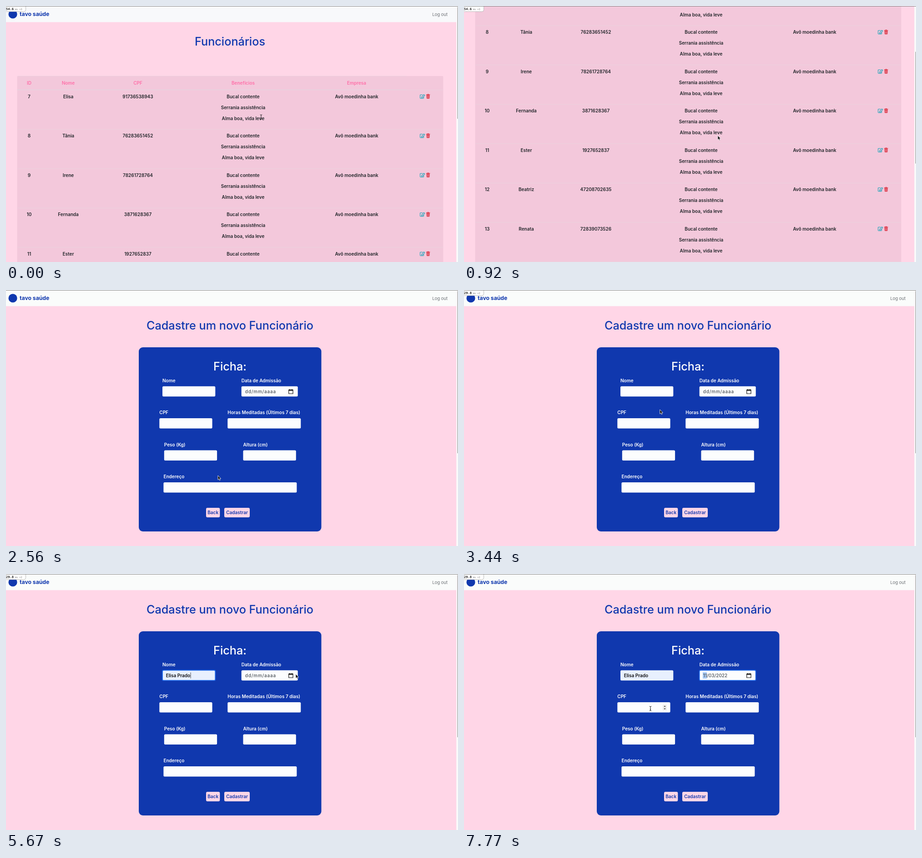
Recreate the animation shown at these times as an HTML page. Size 994 by 563 pixels, loop 8000 ms.

```html
<!DOCTYPE html>
<html lang="pt">
<head>
<meta charset="utf-8">
<style>
  html, body { margin: 0; width: 100%; height: 100%; overflow: hidden; background: #ffd6e7; }
  svg { display: block; width: 994px; height: 563px; }
  text { font: 600 10px Inter, "Open Sans", sans-serif; fill: #212529; white-space: pre; }
  .mid { text-anchor: middle; }
  .title { font-size: 25.2px; font-weight: 500; fill: #1038ae; }
  .head { fill: #ff6fa8; }
  .white { fill: #fff; }
  .light { font-weight: 500; }
  .blue { fill: #1038ae; }
  .brand { font-size: 12.2px; font-weight: 700; fill: #1038ae; }
  .link { font-size: 9.4px; font-weight: 400; fill: #6b6f74; }
  .value { fill: #495057; font-weight: 500; }
  .small { font-size: 7.5px; font-weight: 500; fill: #f1f1f1; }
  .day { font-size: 6.6px; font-weight: 400; fill: #eee; }
  .mono { font: 700 7px "DejaVu Sans Mono", monospace; fill: #222; }
  .unit { font-size: 5.2px; font-weight: 400; fill: #777; }
</style>
</head>
<body>
<svg id="stage" viewBox="0 0 994 563"></svg>
<script>
const DURATION = 8000;
const stage = document.getElementById('stage');

const rect = (x, y, w, h, fill, r = 0, extra = '') =>
  `<rect x="${x}" y="${y}" width="${w}" height="${h}" rx="${r}" fill="${fill}" ${extra}/>`;
const text = (x, y, str, cls = '', extra = '') =>
  `<text x="${x}" y="${y}" class="${cls}" ${extra}>${str}</text>`;
const group = (id, body) => `<g id="${id}">${body}</g>`;

// ---------- employee list ----------
const people = [
  ['Elisa', '91736538943'], ['Tânia', '76283651452'], ['Irene', '78261728764'],
  ['Fernanda', '3871628367'], ['Ester', '1927652837'], ['Beatriz', '47208702635'],
  ['Renata', '72839073526'], ['Valéria', '738493873625'],
];
const benefits = ['Bucal contente', 'Serrania assistência', 'Alma boa, vida leve'];
const columns = { ID: 51, Nome: 137, CPF: 290, Benefícios: 521.5, Empresa: 771 };

const editIcon = `<g fill="none" stroke="#17a2b8" stroke-width="1.1">
  <path d="M916.5 195.3H911.6Q910.7 195.3 910.7 196.2V202.3Q910.7 203.2 911.6 203.2H917.7Q918.6 203.2 918.6 202.3V199.8"/>
  <path d="M914 199.8L919 194.8L920.9 196.6L915.9 201.6L913.8 201.8Z"/></g>`;
const trashIcon = `<g fill="#dc3545"><path d="M924 194.6H926.5L927 193.6H929.4L929.9 194.6H932.4V196H924Z"/>
  <path d="M924.6 196.5H931.8L931.4 202.8Q931.3 203.8 930.4 203.8H926Q925.1 203.8 925 202.8Z"/></g>
  <path d="M926.5 198V202.4M928.2 198V202.4M929.9 198V202.4" stroke="#f3c8db" stroke-width=".6"/>`;

const nav = bg => rect(0, 0, 990.5, 35.5, bg) +
  '<circle cx="15" cy="18" r="9.6" fill="#1038ae"/>' +
  text(30, 21.8, 'tavo saúde', 'brand') +
  text(971, 21.7, 'Log out', 'link', 'text-anchor="end"');

const row = ([name, cpf], i) => `<g transform="translate(0 ${i * 86.5})">` +
  rect(24.5, 184.4, 937, .7, '#e8d4e0') +
  [[51, i + 7], [137, name], [290, cpf], [771, 'Avô moedinha bank']]
    .map(([x, str]) => text(x, 202.6, str, 'mid')).join('') +
  benefits.map((b, k) => text(521.5, 202.6 + k * 24, b, 'mid')).join('') +
  editIcon + trashIcon + '</g>';

const listPage = group('list', nav('#f8f9fb') +
  text(492.5, 87, 'Funcionários', 'title mid') +
  rect(24.5, 154, 937, 722, '#f3c8db', 2) +
  rect(24.5, 153.8, 857, .7, '#ead2de') + rect(24.5, 183.6, 857, 1, '#e2d5de') +
  Object.entries(columns).map(([name, x]) => text(x, 173, name, 'mid head')).join('') +
  people.map(row).join('') +
  rect(440.5, 918.7, 32, 24.8, '#1038ae', 3) + text(456.5, 934.8, 'New', 'mid white light', 'id="newLabel"') +
  rect(485, 918.7, 50.5, 24.8, '#ff7ab2', 3) + text(510, 934.8, 'Go Back', 'mid white light'));

// ---------- form ----------
const field = (x, y, w, label, id = '') =>
  text(x, y - 8.6, label, 'white') + rect(x, y, w, 22.5, '#fcfdfe', 2.5, id && `id="${id}"`);
const ring = (id, x, w) =>
  rect(x, 211.7, w, 22.5, 'none', 2.5, `id="${id}" stroke="#1c66e8" stroke-width="1.8"`);
const button = (x, w, label) =>
  rect(x, 479, w, 21, '#ffd6e7', 3) + text(x + w / 2, 493.2, label, 'mid blue');

const calendarIcon = `<path d="M621.8 219.6H631V228H621.8ZM621.8 220.8H631" fill="none" stroke="#111" stroke-width="1.2"/>
  <path d="M624 218V220M628.8 218V220" stroke="#111" stroke-width="1.3"/>`;
const spinner = rect(437, 287.6, 9, 12.4, '#ececec', 1) +
  '<path d="M439.3 292L441.5 289.6L443.7 292ZM439.3 295.6L441.5 298L443.7 295.6Z" fill="#444"/>';

const suggestions = ['Elisa Prado', 'Tânia', 'Irene', 'Fernanda', 'Ester', 'Beatriz', 'Renata'];
const menu = group('menu', rect(343.8, 236, 116.6, 30, '#292a2d', 1, 'id="menuBox"') +
  text(351, 253.3, suggestions[0], 'small') +
  group('moreNames', suggestions.slice(1).map((s, i) => text(351, 271.3 + i * 18, s, 'small')).join('')));

const dayCell = (col, line, str, opacity = 1) =>
  text(527.5 + col * 19, 272 + line * 17.5, str, 'day mid', `opacity="${opacity}"`);
const days = Array.from({ length: 42 }, (_, i) => {
  const n = i - 1, inMonth = n >= 1 && n <= 31;
  const label = n < 1 ? n + 28 : n > 31 ? n - 31 : n;
  return dayCell(i % 7, Math.floor(i / 7) + 1, label, inMonth ? 1 : .4);
}).join('');
const picker = group('picker', rect(518, 235.5, 133, 171.5, '#292a2d', 1.5) +
  text(524, 251, 'março de 2022', 'small') +
  '<path d="M626 250L628.5 246.5L631 250M638 246.5L640.5 250L643 246.5" fill="none" stroke="#ddd"/>' +
  [...'DSTQQSS'].map((d, i) => dayCell(i, 0, d, .7)).join('') +
  rect(614, 297.5, 17, 15, '#4a77b8', 2) + days +
  text(524, 404, 'Limpar', 'day') + text(645, 404, 'Hoje', 'day', 'text-anchor="end"'));

const formPage = group('form', nav('#fafcfb') +
  text(492.5, 87, 'Cadastre um novo Funcionário', 'title mid') +
  rect(292, 126, 401.5, 405, '#1038ae', 9) +
  text(492.5, 177.3, 'Ficha:', 'title mid', 'style="fill:#fff"') +
  field(344, 211.7, 116.3, 'Nome', 'nameBox') + field(517.7, 211.7, 124, 'Data de Admissão') +
  field(337.3, 282, 116.3, 'CPF') + field(487.3, 282, 161, 'Horas Meditadas (Últimos 7 dias)') +
  field(347.8, 352.5, 116.3, 'Peso (Kg)') + field(521.5, 352.5, 116.3, 'Altura (cm)') +
  field(346.4, 423, 293, 'Endereço') +
  button(440, 30.3, 'Back') + button(480, 56, 'Cadastrar') +
  ring('nameRing', 344, 116.3) + ring('dateRing', 517.7, 124) +
  rect(525, 216, 9, 14, '#a9ccf7', 0, 'id="dateMark"') +
  text(525.8, 226.8, 'dd/mm/aaaa', 'value', 'id="dateText"') + calendarIcon +
  text(351.7, 226.8, '', 'value', 'id="nameText"') +
  rect(352, 216.5, .8, 13, '#222', 0, 'id="caret"') +
  group('spinner', spinner) + menu + picker);

// ---------- pointer and overlays ----------
const pointers =
  group('arrow', '<path d="M0 0V9.3L2.1 7.4L3.6 10.6L5.2 9.9L3.8 6.8H6.7Z" fill="#111" stroke="#fff" stroke-width=".8"/>') +
  group('beam', '<path d="M-2.3 -5Q0 -5 0 -3.6Q0 -5 2.3 -5M0 -4V4M-2.3 5Q0 5 0 3.6Q0 5 2.3 5M-1.2 1.4H1.2" fill="none" stroke="#222" stroke-width="1"/>') +
  group('hand', `<path d="M-.9 1.2Q0 -.2 .9 1.2V4Q2 3.3 2.5 4.3Q3.5 3.7 4 4.7Q5.3 4.5 5.2 6V8Q4.6 9.2 4.4 10.6H-.8
    Q-1.4 8.8 -3.2 6.7Q-3.6 5.4 -2 5.8L-.9 6.8Z" fill="#fff" stroke="#111" stroke-width=".9"/>`);

const badge = group('badge',
  rect(-5, -5, 48.5, 17.3, '#fff', 4, 'stroke="#aaa" stroke-width=".8"') +
  '<text x="0" y="9.2" class="mono"><tspan id="badgeTime"></tspan><tspan class="unit" id="badgeUnit"></tspan></text>');

stage.innerHTML = rect(0, 0, 994, 563, '#ffd6e7') + listPage + formPage +
  rect(990.3, 0, 3.7, 563, '#fafafa') + rect(992.7, 2, 1.3, 246, '#a4a4a4', .6, 'id="thumb"') +
  badge + rect(0, 0, 994, 1, '#858585') + group('pointer', pointers);

const el = Object.fromEntries([...stage.querySelectorAll('[id]')].map(n => [n.id, n]));
const show = (name, on) => el[name].setAttribute('display', on ? 'inline' : 'none');
const set = (name, attrs) => Object.entries(attrs).forEach(([k, v]) => el[name].setAttribute(k, v));

// ---------- timing ----------
const refreshes = [[0, 0, 1], [170, 1070, 7], [1220, 1960, 6], [2560, 3590, 8], [3890, 4040, 2],
  [4340, 4340, 1], [4780, 5820, 8], [5970, 6870, 7], [7170, 7770, 5]]
  .flatMap(([a, b, n]) => Array.from({ length: n }, (_, i) => n > 1 ? Math.floor(a + (b - a) * i / (n - 1)) : a));

const scrollKeys = [[0, 0], [320, 4], [470, 35], [620, 100], [770, 175], [920, 228], [1070, 515], [1220, 524], [1368, 526]];
const pointerKeys = [[0, 561, 244], [920, 558, 285], [1220, 556, 290], [1810, 468, 406], [1960, 466, 408],
  [2560, 466, 408], [3590, 422, 227], [4340, 422, 227], [4930, 408, 250], [5075, 412, 249],
  [5670, 637, 220], [5820, 628, 223], [5970, 627, 223], [6870, 622, 305], [7170, 622, 305], [7770, 410, 296]];

function sample(keys, t) {
  const i = keys.findIndex(k => k[0] > t);
  if (i < 0) return keys[keys.length - 1].slice(1);
  const a = keys[i - 1], b = keys[i], p = (t - a[0]) / (b[0] - a[0]);
  const e = p * p * (3 - 2 * p);
  return a.slice(1).map((v, k) => v + (b[k + 1] - v) * e);
}

function pointerKind(t) {
  if (t < 320 || (t >= 3440 && t < 4780) || t >= 7470) return 'beam';
  return t >= 1800 && t < 2560 ? 'hand' : 'arrow';
}

function render(time) {
  const t = refreshes.filter(r => r <= time).pop();
  const onForm = t >= 2560;
  const [scroll] = sample(scrollKeys, t);
  show('list', !onForm);
  show('form', onForm);
  set('list', { transform: `translate(0 ${-scroll})` });
  set('thumb', onForm ? { y: 2, height: 357 } : { y: 2 + scroll * .432, height: 246 });
  el.newLabel.style.fill = t >= 1800 ? '#0b50ad' : '#fff';

  show('badge', !onForm || t > 2560);
  el.badgeTime.textContent = onForm ? '29.8' : '54.6';
  el.badgeUnit.textContent = onForm ? ' ms ×2' : ' ms ×3';

  const filled = t >= 5070, dated = t >= 7170;
  const focusName = t >= 3590 && t < 5970;
  el.nameText.textContent = filled ? 'Elisa Prado' : t >= 4340 ? 'El' : t >= 4040 ? 'E' : '';
  el.nameText.style.cssText = filled ? 'fill:#111;font-weight:600' : '';
  set('nameBox', { fill: filled ? '#e8f0fe' : '#fcfdfe' });
  show('nameRing', focusName);
  show('caret', focusName);
  if (focusName) set('caret', { x: 352.2 + el.nameText.getComputedTextLength() });
  show('menu', t >= 3890 && !filled);
  show('moreNames', t < 4040);
  set('menuBox', { height: t < 4040 ? 138.5 : 30 });

  show('dateRing', t >= 5970);
  show('dateMark', t >= 5970);
  set('dateMark', { width: dated ? 9 : 15 });
  el.dateText.textContent = dated ? '11/03/2022' : 'dd/mm/aaaa';
  el.dateText.style.letterSpacing = dated ? '0' : '.8px';
  show('picker', t >= 5970 && !dated);
  show('spinner', t >= 7470);

  const [x, y] = sample(pointerKeys, t), kind = pointerKind(t);
  set('pointer', { transform: `translate(${x} ${y})` });
  ['arrow', 'beam', 'hand'].forEach(k => show(k, k === kind));
}

const start = performance.now();
function tick() {
  render((performance.now() - start) % DURATION);
  requestAnimationFrame(tick);
}
tick();
</script>
</body>
</html>
```
